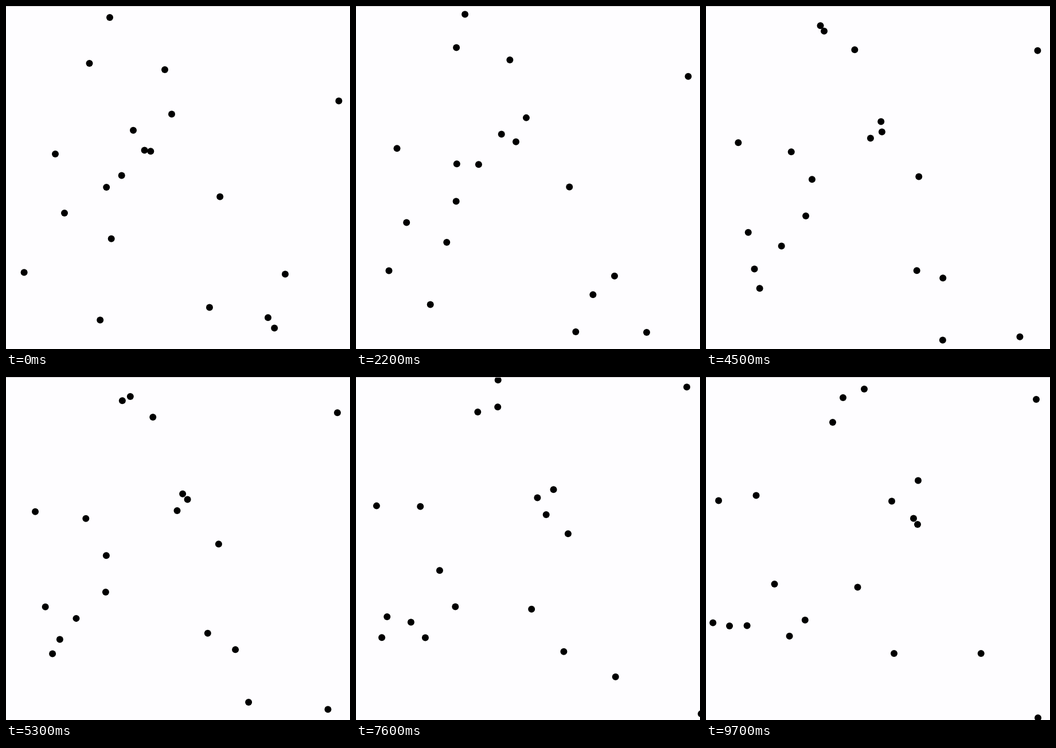
An HTML page with a canvas that plays this animation: 600x598 px, repeating every 9.8 s.

```html
<!DOCTYPE html>
<html lang="en">
<head>
<meta charset="utf-8">
<title>Bouncing dots</title>
<style>
  html, body { margin: 0; width: 100%; height: 100%; overflow: hidden; background: #fefdff; }
  canvas { display: block; width: 600px; height: 598px; }
</style>
</head>
<body>
<canvas id="stage" width="600" height="598"></canvas>
<script>
const ctx = document.getElementById('stage').getContext('2d');
const LOOP = 9800, STEP = 100, RADIUS = 6;
const WALLS = { left: 0, right: 609, top: 7.8, bottom: 597.5 };

// Each dot glides in a straight line between two key points.
// A finish beyond a wall is folded back inside, which makes the bounce.
const glide = (from, to, top = WALLS.top) => ({ from, to, top });
const dots = [
  glide([181, 20], [221, -63.4]),
  glide([145.5, 100], [276, -21], 0),
  glide([277, 111], [239, 36]),
  glide([580.5, 165.5], [576, -23.5]),
  glide([289, 188.5], [324, 216.6]),
  glide([86, 258], [22, 215.4]),
  glide([241.6, 251.5], [119.5, 361]),
  glide([252.3, 253.2], [370, 180.4]),
  glide([201.7, 295.4], [87.5, 206.5]),
  glide([175.2, 316], [172.8, 423.8]),
  glide([102, 361], [41, 433.9]),
  glide([183.7, 405.8], [71.6, 433.4]),
  glide([373.2, 332.6], [369, 257]),
  glide([31.6, 464.4], [145.6, 451.8]),
  glide([164.2, 547.5], [12.1, 428.6]),
  glide([355, 525.6], [479.7, 712.9]),
  glide([487, 467.5], [328, 481.9]),
  glide([457, 543.3], [264.5, 366.4]),
  glide([468.2, 561.6], [639, 594.3]),
  glide([222, 216.8], [362, 246.4])
];

function fold(value, low, high) {
  if (value < low) return 2 * low - value;
  return value > high ? 2 * high - value : value;
}

function drawDot({ from, to, top }, progress) {
  const [x, y] = from.map((start, i) => start + (to[i] - start) * progress);
  ctx.beginPath();
  ctx.arc(fold(x, WALLS.left, WALLS.right), fold(y, top, WALLS.bottom),
          RADIUS, 0, Math.PI * 2);
  ctx.fill();
}

function draw(time) {
  ctx.fillStyle = '#fefdff';
  ctx.fillRect(0, 0, 600, 598);
  ctx.fillStyle = '#000';
  for (const dot of dots) drawDot(dot, time / (LOOP - STEP));
  ctx.fillStyle = '#cfcdd0';
  ctx.fillRect(0, 0, 600, 1);
}

const start = performance.now();
function tick() {
  const elapsed = (performance.now() - start) % LOOP;
  draw(Math.floor(elapsed / STEP) * STEP);
  requestAnimationFrame(tick);
}
tick();
</script>
</body>
</html>
```
